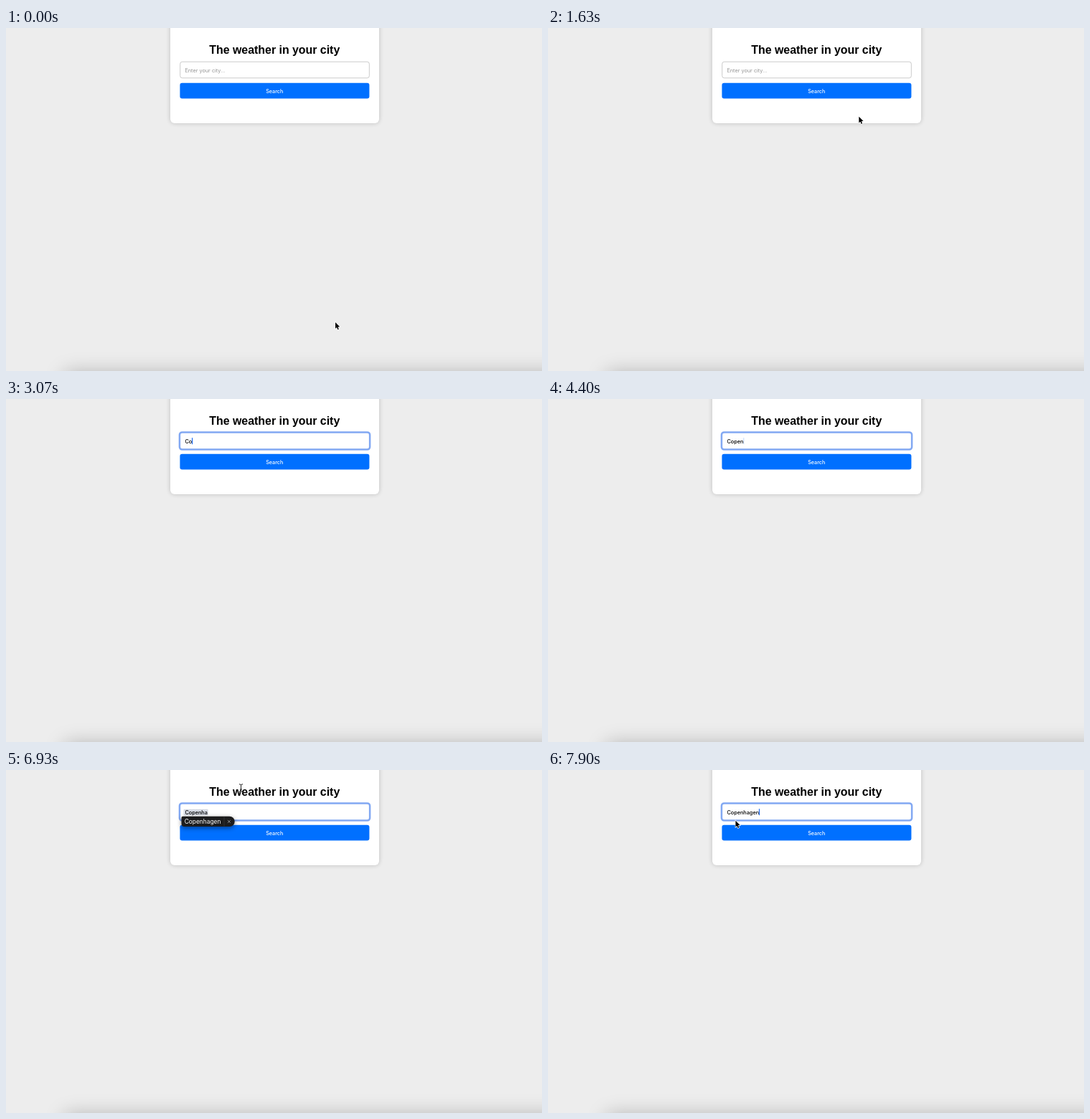
Animation, 747 px wide and 479 px high, one loop 8 s. Source, as an HTML page:

```html
<!DOCTYPE html>
<html lang="en">
<head>
<meta charset="utf-8">
<title>The weather in your city</title>
<style>
  html, body { margin: 0; width: 100%; height: 100%; overflow: hidden; background: #ededed; }
  #stage { position: relative; width: 747px; height: 479px; overflow: hidden; background: #ededed; }
  #card { position: absolute; left: 229px; top: -20px; width: 290.5px; height: 152.5px; border-radius: 6px;
    background: #fff; box-shadow: 0 0 6px rgba(0, 0, 0, .2); }
  #edge { position: absolute; left: 82px; top: 482px; width: 760px; height: 60px;
    box-shadow: 0 0 28px rgba(0, 0, 0, .27); }
  svg { position: absolute; left: 0; top: 0; }
  text { font-family: Inter, sans-serif; white-space: pre; }
  .title { font: bold 15.9px "Liberation Sans", Arial, sans-serif; }
  .field { font-size: 7.3px; }
  .strong { font-weight: 500; }
  #plate { filter: drop-shadow(0 2px 3px rgba(0, 0, 0, .45)); }
</style>
</head>
<body>
<div id="stage">
  <div id="card"></div>
  <div id="edge"></div>
  <svg width="747" height="479" viewBox="0 0 747 479">
    <defs>
      <path id="bar" d="M-2.6 -5.4Q0 -5.4 0 -4Q0 -5.4 2.6 -5.4M0 -4V4M-2.6 5.4Q0 5.4 0 4Q0 5.4 2.6 5.4M-1.2 1.8H1.2"/>
    </defs>
    <text class="title" x="374.3" y="36.2" text-anchor="middle">The weather in your city</text>
    <rect id="ring" x="241.9" y="46.4" width="265.2" height="24.2" rx="3.6" fill="#fff" stroke="#82a8f2" stroke-width="2.5"/>
    <rect id="box" x="242.7" y="47.2" width="263.6" height="22.6" rx="3" fill="#fff" stroke="#cacaca"/>
    <rect id="button" x="242.4" y="76.8" width="264" height="21.7" rx="3"/>
    <text class="strong" x="374.2" y="90.7" text-anchor="middle" font-size="7.2" fill="#fff">Search</text>
    <rect id="mark" x="247.6" y="54.7" width="34" height="8.6" rx="1" fill="#d6dae3"/>
    <text id="hint" class="field" x="249.4" y="61.7" fill="#959595">Enter your city...</text>
    <text id="typed" class="field strong" x="249.4" y="61.7"></text>
    <rect id="caret" y="54.2" width="1.2" height="9" fill="#1f6cf0"/>
    <g id="popup">
      <path id="plate" d="M246.5 64.7H311.5a7.2 7.2 0 0 1 0 14.4H248.5a4 4 0 0 1 -4 -4V66.7a2 2 0 0 1 2 -2Z" fill="#1c1c1d"/>
      <path d="M304 65.4V78.4" stroke="#3c3c3e" stroke-width=".7"/>
      <path d="M308.9 70l3.9 3.9m0 -3.9l-3.9 3.9" stroke="#a9a9ab" stroke-width=".8"/>
      <text x="248.7" y="74.9" font-size="8.4" fill="#fff">Copenhagen</text>
    </g>
    <path id="arrow" d="M0 0V8.8L2 7.1 3.4 10.3 4.8 9.7 3.5 6.5 6.2 6.3Z" stroke="#fff" stroke-width="1.3" paint-order="stroke"/>
    <g id="beam" fill="none">
      <use href="#bar" stroke="#fff" stroke-width="1.8" opacity=".6"/>
      <use href="#bar" stroke="#111" stroke-width=".95"/>
    </g>
  </svg>
</div>
<script>
const LOOP = 8000, FOCUS = 2230, POPUP = 5530, PICK = 7800, RETURN = 6570;
const WORD = "Copenhagen";
const keyTimes = [2730, 3070, 3200, 3300, 3470, 4600, 4800];
const $ = id => document.getElementById(id);

// each move eases out from where the last one ended
const moves = [
  { from: 400, to: 670, x: 490, y: 294, power: 1 },
  { from: 1400, to: 1630, x: 433.5, y: 124, power: 1 },
  { from: 1630, to: 2130, x: 399, y: 66, power: 3 },
  { from: RETURN, to: 7070, x: 300, y: 9.5, power: 1 },
  { from: 7070, to: 7370, x: 263, y: 79, power: 1 },
  { from: 7400, to: 7900, x: 261.4, y: 70.8, power: 2 }
];

const ramp = (t, from, to) => Math.min(1, Math.max(0, (t - from) / (to - from)));

function pointer(t) {
  let x = 459, y = 411;
  for (const m of moves) {
    const k = 1 - (1 - ramp(t, m.from, m.to)) ** m.power;
    x += (m.x - x) * k;
    y += (m.y - y) * k;
  }
  return [x, y];
}

// the button darkens while the pointer is over it
const pulse = (t, enter, leave) => ramp(t, enter, enter + 100) - ramp(t, leave, leave + 100);
const hover = t => pulse(t, 1740, 1900) + pulse(t, 7320, PICK);

// the caret fades out and back once a period, and stays lit after a key
function caret(t) {
  const rest = t < 4600 ? 4000 : 5560;
  if (t < FOCUS) return 0;
  if (t < rest || t >= PICK) return 1;
  const phase = (t - rest) % 1030;
  return 1 - ramp(phase, 0, 130) + ramp(phase, 370, 500);
}

const show = (id, on) => $(id).setAttribute("visibility", on ? "visible" : "hidden");
const within = (x, y, l, t, r, b) => x > l && x < r && y > t && y < b;

function draw(t) {
  const [x, y] = pointer(t), dark = hover(t);
  const count = t >= PICK ? WORD.length : keyTimes.filter(k => t >= k).length;
  const open = t >= POPUP && t < PICK;

  show("ring", t >= FOCUS);
  show("box", t < FOCUS);
  show("hint", !count);
  show("mark", open);
  show("popup", open);
  $("button").setAttribute("fill", `rgb(0,${112 - 37 * dark},${255 - 84 * dark})`);

  $("typed").textContent = WORD.slice(0, count);
  $("caret").setAttribute("x", 249.2 + (count && $("typed").getComputedTextLength()));
  $("caret").setAttribute("opacity", caret(t));

  // the pointer hides while typing and turns into a beam over text
  const shown = t < keyTimes[0] || t >= RETURN;
  const beam = !open || y < 64 || x > 319
    ? within(x, y, 242, 47, 507, 70) || within(x, y, 284, 21, 465, 41)
    : false;
  show("beam", shown && beam);
  show("arrow", shown && !beam);
  for (const id of ["arrow", "beam"]) $(id).setAttribute("transform", `translate(${x} ${y})`);
}

const start = performance.now();
function tick(now) {
  draw(Math.max(0, now - start) % LOOP);
  requestAnimationFrame(tick);
}
draw(0);
requestAnimationFrame(tick);
</script>
</body>
</html>
```
